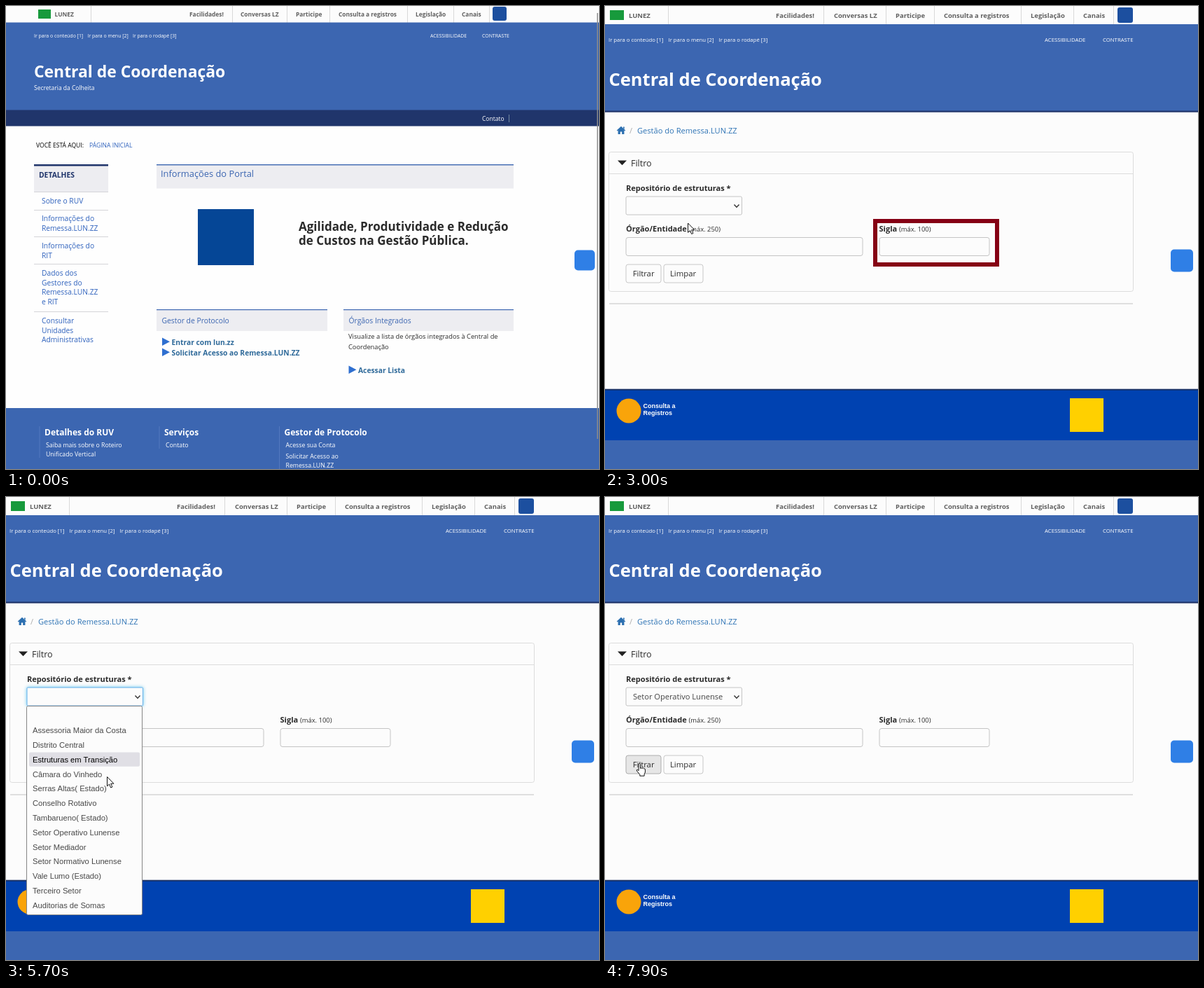
Write an HTML page that moves like this. It is 847x661 px and loops after 8000 ms.

```html
<!DOCTYPE html>
<html lang="pt">
<head>
<meta charset="utf-8">
<style>
  html, body { margin: 0; width: 100%; height: 100%; overflow: hidden; background: #fcfcfc; }
  svg { display: block; width: 847px; height: 661px; font-family: "Open Sans", sans-serif; }
  .sans { font-family: "Liberation Sans", Arial, sans-serif; }
  .glow { filter: drop-shadow(0 0 2.5px #66c8f0); }
</style>
</head>
<body>
<svg id="stage" viewBox="0 0 847 661"></svg>
<script>
const BLUE = '#3c66b1', NAVY = '#20356b', LINK = '#2f62bd', INK = '#2b2b2b', GRAY = '#606060';
const LOOP = 8000;

const text = (x, y, str, size, fill = INK, attrs = '') =>
  `<text x="${x}" y="${y}" font-size="${size}" fill="${fill}" ${attrs}>${str}</text>`;
const bold = (x, y, str, size, fill) => text(x, y, str, size, fill, 'font-weight="700"');
const medium = (x, y, str, size, fill = '#fff') => text(x, y, str, size, fill, 'font-weight="500"');
const lines = (x, y, pitch, list, size, fill, draw = text) =>
  list.map((str, i) => draw(x, y + i * pitch, str, size, fill)).join('');
const rect = (x, y, w, h, fill, attrs = '') =>
  `<rect x="${x}" y="${y}" width="${w}" height="${h}" fill="${fill}" ${attrs}/>`;
const frame = (x, y, w, h, stroke = '#c4c4c4', r = 3, fill = '#fcfcfc', attrs = '') =>
  rect(x + .5, y + .5, w - 1, h - 1, fill, `rx="${r}" stroke="${stroke}" ${attrs}`);
const path = (d, fill, attrs = '') => `<path d="${d}" fill="${fill}" ${attrs}/>`;

const tabs = ['Facilidades!', 'Conversas LZ', 'Participe', 'Consulta a registros', 'Legislação', 'Canais'];

function topBar({ height, base, size, flag, name, tabXs, seps, icon }) {
  return rect(0, 0, 847, height, '#fcfcfc') +
    rect(...flag, '#179a3c') + bold(name, base, 'LUNEZ', size, GRAY) +
    tabs.map((tab, i) => bold(tabXs[i], base, tab, size, GRAY)).join('') +
    seps.map(x => rect(x, 0, 1, height, '#d9d9d9')).join('') +
    rect(...icon, '#1c4f9f', 'rx="3"');
}

function shortcuts(xs, y, size) {
  return ['Ir para o conteúdo [1]', 'Ir para o menu [2]', 'Ir para o rodapé [3]', 'ACESSIBILIDADE', 'CONTRASTE']
    .map((str, i) => medium(xs[i], y, str, size)).join('');
}

function homePage() {
  const card = (x, w, title) =>
    rect(x, 433, w, 31, '#ededf1') + rect(x, 433, w, 1.2, BLUE) + text(x + 7.5, 453, title, 10.35, BLUE);
  const bullet = (x, y, str) =>
    path(`M${x} ${y - 10}l11 5.7-11 5.7z`, '#2f6fd0') + bold(x + 13.5, y, str, 10.3, '#2f6a9a');
  const column = (x, h, title) =>
    rect(x - 7.5, 600, 1, h, '#5379bf') + bold(x, 612.5, title, 12, '#fff');

  return rect(0, 0, 847, 661, '#fefefe') +
    topBar({
      height: 24, base: 14.5, size: 8.4, flag: [46, 5, 18, 13], name: 69.5,
      tabXs: [262, 335, 414, 475, 585, 651], seps: [121, 323, 401, 462, 573, 639, 690], icon: [695, 1, 20, 20]
    }) +
    rect(0, 23.5, 847, 126, BLUE) + rect(0, 148.5, 847, 23, NAVY) +
    shortcuts([40, 116.5, 181, 606, 680], 45, 6.95) +
    bold(40, 102, 'Central de Coordenação', 22.9, '#fff') +
    medium(40, 120, 'Secretaria da Colheita', 8.5) +
    medium(680, 163.5, 'Contato', 8.5) + rect(718, 155, 1, 11, '#7288a0') +
    text(43, 202, 'VOCÊ ESTÁ AQUI:', 8.55, '#000') + text(119, 202, 'PÁGINA INICIAL', 8.55, LINK) +

    rect(40, 226, 106, 39, '#ededf1') + rect(40, 226, 106, 2.5, NAVY) + bold(47, 244.7, 'DETALHES', 10.3, NAVY) +
    [265, 291, 329, 368, 436].map(y => rect(40, y, 106, 1, '#d4d4d8')).join('') +
    text(51, 282, 'Sobre o RUV', 10.25, LINK) +
    lines(51, 307, 13.5, ['Informações do', 'Remessa.LUN.ZZ'], 10.25, LINK) +
    lines(51, 346, 13.5, ['Informações do', 'RIT'], 10.25, LINK) +
    lines(51, 385.3, 13.5, ['Dados dos', 'Gestores do', 'Remessa.LUN.ZZ', 'e RIT'], 10.25, LINK) +
    lines(51, 453.3, 13.5, ['Consultar', 'Unidades', 'Administrativas'], 10.25, LINK) +

    rect(215, 226, 510, 34.5, '#ededf1') + rect(215, 226, 510, 1.4, BLUE) +
    text(221, 244, 'Informações do Portal', 12.85, BLUE) +
    rect(274, 290, 80, 80, '#054696') +
    bold(418, 321, 'Agilidade, Produtividade e Redução', 17) +
    bold(418, 340.5, 'de Custos na Gestão Pública.', 17) +

    card(215, 244, 'Gestor de Protocolo') + card(482, 243, 'Órgãos Integrados') +
    bullet(223, 483.5, 'Entrar com lun.zz') + bullet(223, 498.5, 'Solicitar Acesso ao Remessa.LUN.ZZ') +
    lines(489, 475, 15, ['Visualize a lista de órgãos integrados à Central de', 'Coordenação'], 9.3) +
    bullet(489.5, 523.5, 'Acessar Lista') +

    rect(0, 574, 847, 87, BLUE) +
    column(55, 45, 'Detalhes do RUV') + column(226, 32, 'Serviços') + column(397.5, 61, 'Gestor de Protocolo') +
    lines(57, 630, 12.5, ['Saiba mais sobre o Roteiro', 'Unificado Vertical'], 8.75, '#fff', medium) +
    medium(228, 630, 'Contato', 8.75) + medium(399.5, 630, 'Acesse sua Conta', 8.75) +
    lines(399.5, 646, 12.7, ['Solicitar Acesso ao', 'Remessa.LUN.ZZ'], 8.75, '#fff', medium) +
    rect(812, 348.5, 29, 29, '#2f7fe6', 'rx="5"') + rect(844, 10, 1.5, 608, '#8c8c8c');
}

const options = ['', 'Assessoria Maior da Costa', 'Distrito Central', 'Estruturas em Transição', 'Câmara do Vinhedo',
  'Serras Altas( Estado)', 'Conselho Rotativo', 'Tambarueno( Estado)', 'Setor Operativo Lunense', 'Setor Mediador',
  'Setor Normativo Lunense', 'Vale Lumo (Estado)', 'Terceiro Setor', 'Auditorias de Somas'];

function dropdown(active) {
  return frame(29, 298, 166, 299, '#858585', 2) +
    options.map((option, i) => {
      const mid = 312.2 + i * 20.8;
      return (i === active ? rect(33, mid - 10.2, 158, 20.4, '#e0dfe5', 'rx="2"') : '') +
        text(38, mid + 4.2, option, 11.2, i === active ? '#000' : '#484848', 'class="sans"');
    }).join('');
}

function filterPage({ value = '', focus, glow, hover, active }) {
  return rect(0, 0, 847, 661, '#fcfcfc') +
    topBar({
      height: 26, base: 17, size: 9.45, flag: [7, 6, 20, 14], name: 34,
      tabXs: [244, 327, 415, 484, 608, 683], seps: [90, 312, 401, 470, 594, 669, 726], icon: [732, 2, 22, 22]
    }) +
    rect(0, 26, 847, 124, BLUE) + rect(0, 149.5, 847, 2.2, NAVY) +
    shortcuts([5, 90.5, 162.5, 628, 711], 51, 7.75) +
    bold(5.5, 113.5, 'Central de Coordenação', 25.5, '#fff') +
    path('M23 171.8l6.2 5.7-.8.9-1-.9v5.5h-3.2v-3.6h-2.4v3.6h-3.2v-5.5l-1 .9-.8-.9zM26 172.5h1.7v3.3l-1.7-1.5z', '#2c6fb0') +
    text(35, 182.3, '/', 11, '#aaa') + text(46, 182.3, 'Gestão do Remessa.LUN.ZZ', 11.1, '#2f74b5') +

    frame(5, 208, 750, 200, '#dcdcdc') + rect(6, 239, 748, 1, '#dcdcdc') +
    path('M18 220.5h13l-6.5 6.8z', '#222') + text(37, 229, 'Filtro', 12.5) +
    bold(30, 263.5, 'Repositório de estruturas *', 11.05) +
    frame(29.5, 271.5, 166.5, 27, focus ? '#66afe9' : '#c4c4c4', focus ? 1 : 2, '#fcfcfc', glow ? 'class="glow"' : '') +
    text(40, 289.3, value, 11.1, '#444') +
    path('M184.5 283.5l3.5 3.7 3.5-3.7', 'none', 'stroke="#333" stroke-width="1.4"') +
    bold(30, 322, 'Órgão/Entidade', 11.05) + text(119.5, 322, '(máx. 250)', 9.4) +
    bold(391.5, 322, 'Sigla', 11.05) + text(420, 322, '(máx. 100)', 9.4) +
    frame(29.5, 330, 339, 27) + frame(391.5, 330, 158, 27) +
    frame(29.5, 368.5, 51, 27, hover ? '#adadad' : '#c8c8c8', 3, hover ? '#e6e6e6' : '#fcfcfc') +
    text(39.7, 386, 'Filtrar', 11.3) +
    frame(83.5, 368.5, 57, 27, '#c8c8c8') + text(93, 386, 'Limpar', 11.3) +
    rect(6, 424, 748, 2, '#dfdfdf') +

    rect(0, 547, 847, 73, '#0042b1') + rect(0, 546.7, 847, 2, '#1b3266') + rect(0, 620, 847, 41, BLUE) +
    '<circle cx="34" cy="578" r="17.5" fill="#f9a40a"/>' +
    ['Consulta a', 'Registros'].map((str, i) =>
      text(54.5, 574 + i * 10.3, str, 9, '#fff', 'class="sans" font-weight="700"')).join('') +
    rect(664, 560, 48, 48, '#ffd000') +
    rect(808, 347.5, 32, 32, '#2f7fe6', 'rx="5"') +
    (active === undefined ? '' : dropdown(active));
}

const outline = 'stroke="#111" stroke-width="1" stroke-linejoin="round"';
const arrow = 'M.5.5v13.3l3-2.8 2.2 5 2.2-1-2.2-4.8h4.2z';
const hand = 'M3.6 1.5q1.6-1.4 2.4.4v6l1.5-.7 1.2.8 1.4-.5 1 .9q1.6-.5 1.8 1v4.1l-1.3 2.8v2.4H5.3v-1.9L1 11.6q-1-1.6.8-1.9l1.8 1.5z';

function pointer({ cursor, grab }) {
  if (!cursor) return '';
  return `<g transform="translate(${cursor})">${path(grab ? hand : arrow, '#fff', outline)}</g>`;
}

const highlight = ([x, y, w, h]) =>
  rect(x + 3, y + 3, w - 6, h - 6, 'none', 'stroke="#850014" stroke-width="6"');

// Each step overrides part of the state from its time onwards.
const steps = [
  [0, { page: homePage }],
  [200, { mark: [35, 437, 116, 53] }],
  [1900, { page: filterPage, mark: null, cursor: [118, 309.5] }],
  [2000, { mark: [22, 304, 356, 68] }],
  [3000, { mark: [383, 304, 180, 68] }],
  [4000, { mark: [22, 247, 182, 60] }],
  [5000, { mark: null, cursor: [165, 282], focus: true, active: 0 }],
  [5100, { glow: true, cursor: [158, 306] }],
  [5300, { cursor: [153, 344.5], active: 1 }],
  [5500, { cursor: [150, 348], active: 2 }],
  [5700, { cursor: [144, 399], active: 3 }],
  [5900, { cursor: [138, 409], active: 5 }],
  [6100, { cursor: [134, 432], active: 6 }],
  [6300, { cursor: [132, 454], active: 7 }],
  [6500, { cursor: [132, 458.5] }],
  [6700, { cursor: [130, 474], active: 8 }],
  [6900, { cursor: [130, 477.5], active: undefined, value: options[8] }],
  [7900, { cursor: [44.5, 379.5], focus: false, glow: false, hover: true, grab: true }]
];

const stage = document.getElementById('stage');
let shown = 0;

function draw(now) {
  const time = now % LOOP;
  const current = steps.filter(([start]) => start <= time);
  if (current.length !== shown) {
    shown = current.length;
    const state = Object.assign({}, ...current.map(([, change]) => change));
    stage.innerHTML = state.page(state) + (state.mark ? highlight(state.mark) : '') + pointer(state);
  }
  requestAnimationFrame(draw);
}
draw(performance.now());
</script>
</body>
</html>
```
